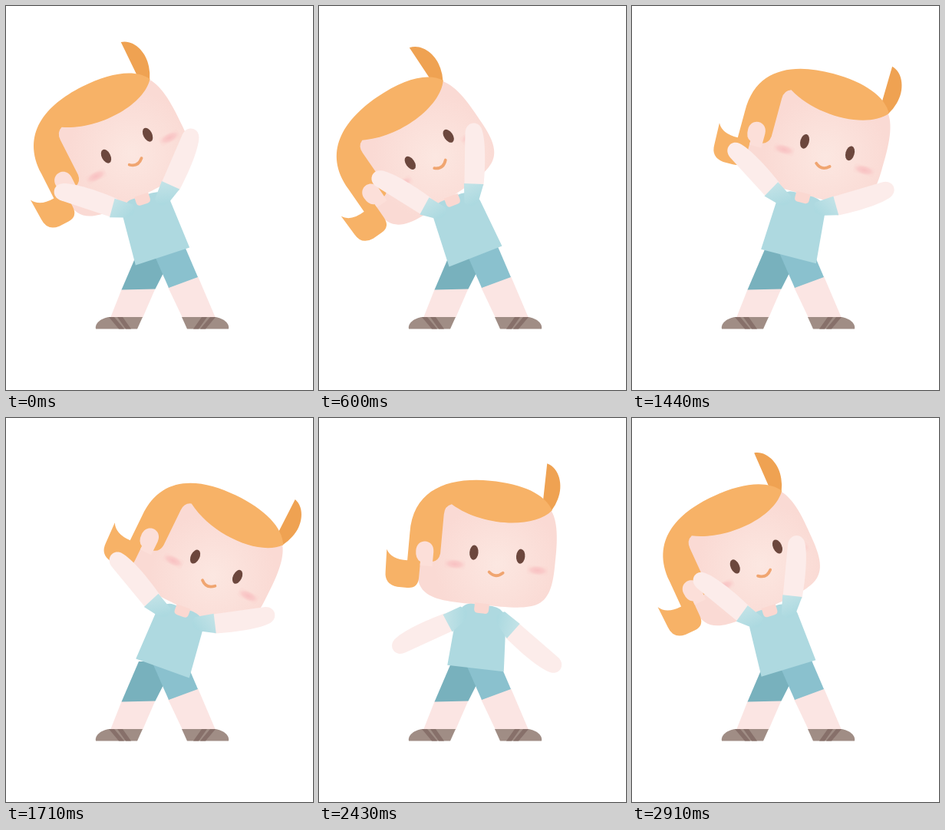
An HTML page for the animation above (2940 ms loop, 400 by 500 pixels).

```html
<!DOCTYPE html>
<html lang="en">
<head>
<meta charset="utf-8">
<title>Side stretch</title>
<style>
  html, body { margin: 0; width: 100%; height: 100%; overflow: hidden; background: #fff; }
  svg { display: block; width: 100vw; height: 100vh; }
</style>
</head>
<body>
<svg viewBox="0 0 400 500">
  <defs>
    <radialGradient id="face" gradientUnits="userSpaceOnUse" cx="222" cy="188" r="82">
      <stop offset="0" stop-color="#fce7e1"/>
      <stop offset="1" stop-color="#fadad4"/>
    </radialGradient>
    <radialGradient id="blush">
      <stop offset="0" stop-color="#f8bdbf" stop-opacity=".9"/>
      <stop offset=".6" stop-color="#f9c4c4" stop-opacity=".7"/>
      <stop offset="1" stop-color="#fad2ce" stop-opacity=".25"/>
    </radialGradient>
    <linearGradient id="cloth" gradientUnits="userSpaceOnUse" x1="-8" y1="-25" x2="5" y2="0">
      <stop offset="0" stop-color="#c3e3e7"/>
      <stop offset="1" stop-color="#acd9e0"/>
    </linearGradient>
    <path id="arm" fill="#fcecea" d="M-12,-21 L-10.5,-90 C-10,-104 6,-107 11,-95 C16,-82 16,-50 13,-21 Z"/>
    <path id="sleeve" fill="url(#cloth)" d="M-12.5,-24 L13,-23 L7,-3 Q0,12 -12,1 Z"/>
    <g id="shoe">
      <path fill="#a08d85" d="M117,420.500 C115,412 127,405 136,405 H178 L171,420.500 Z"/>
      <path fill="#87706a" d="M134,405 H141 L154,420.500 H147 Z M145,405 H152 L163,420.500 H156 Z"/>
    </g>
  </defs>

  <path fill="#fbe5e3" d="M151,368 H194.500 L178,406 H136 Z"/>
  <path fill="#fbe5e3" d="M211,366 L250,352 L273,406 H230 Z"/>
  <path fill="#78b1bd" d="M173,317 H215 L210,338 L194.500,368.500 L150.500,369.500 Z"/>
  <path fill="#8ac1ce" d="M190,317 L232,311 L250,353 L212,367 Z"/>
  <use href="#shoe"/>
  <use href="#shoe" transform="translate(407 0) scale(-1 1)"/>

  <g id="head">
    <path fill="#efa252" d="M275,52 C291,56 299,78 293,97 Q291,105 286,113 L274,106 Z"/>
    <path fill="url(#face)" d="M120,130 Q200,80 284,110 C296,124 298,150 297,182
      C297,205 295,226 280,235 C265,244 240,243 205,243 C160,242 119,246 120,205 Z"/>
    <path fill="#f7b267" d="M105,194 V158 C104,100 150,81 203,81 C246,81 276,92 287,112
      C265,139 197,141 156,116 Q147,119 147,130 V181 Q146,191 137,193 L122,195 V215
      Q122,229.500 108,229.500 H95 Q78,228 78,211 L77,182 Q84,195 105,194 Z"/>
    <path fill="#fcdfd9" d="M115,180 C115,163 138,163 138,180 V199 H122 V194 Q115,191 115,180 Z"/>
    <rect x="153" y="187" width="28" height="12.500" rx="4" fill="url(#blush)"/>
    <rect x="261" y="185.500" width="28" height="12.500" rx="4" fill="url(#blush)"/>
    <ellipse cx="190.500" cy="176" rx="5.700" ry="9.600" fill="#6c473d"/>
    <ellipse cx="251.500" cy="175.500" rx="5.700" ry="9.600" fill="#6c473d"/>
    <path fill="none" stroke="#f0a570" stroke-width="3.800" stroke-linecap="round" d="M212.500,199.500 Q221.500,207.500 230.500,199"/>
  </g>

  <g id="torso">
    <path fill="#aed9e0" d="M-26,-78 Q-22,-83 -15,-83 H12 L18,-82 Q28,-80 32,-66 L37,0 H-37 L-33,-66 Z"/>
    <path fill="#fbd8d1" d="M-11,-85 H8 V-77 Q8,-72 3,-72 H-6 Q-11,-72 -11,-77 Z"/>
    <g id="left">
      <use href="#arm"/>
      <use href="#sleeve" transform="scale(-1 1)"/>
    </g>
    <g id="right">
      <use href="#arm"/>
      <use href="#sleeve"/>
    </g>
  </g>
</svg>

<script>
const LOOP = 2940, TURN = 1410, STEP = 30;
const HIP = [204, 326], NECK = [-2, -73], SHOULDER = [23.5, -67];

// Head tilt: two dips to each side, as [ms, degrees]
const TILT = [[0, -27.4], [140, -35.3], [350, -29], [590, -35.2], [1020, -1], [1440, 14.7],
  [1650, 27], [1890, 17], [2085, 27.4], [2430, 4.7], [2910, -25.2]];

// Arms for one side: open, clap above, clap below, clap above, as [share of the side, degrees]
const CLAP = [[0, 47.5], [.02, 58], [.08, 61], [.35, 60], [.42, 29.5], [.48, 31],
  [.667, 123], [.705, 187], [.725, 188], [.84, 31], [.98, 28]];

// Smooth cyclic curve through the keys that never overshoots them
function curve(keys, period, t) {
  const n = keys.length;
  const at = i => {
    const [x, y] = keys[(i + n) % n];
    return [x + Math.floor(i / n) * period, y];
  };
  const rise = i => (at(i + 1)[1] - at(i)[1]) / (at(i + 1)[0] - at(i)[0]);
  const slope = i => {
    const u = rise(i - 1), v = rise(i);
    return u * v <= 0 ? 0 : 2 * u * v / (u + v);
  };
  let i = n - 1;
  while (keys[i][0] > t) i--;
  const [x0, y0] = at(i), [x1, y1] = at(i + 1);
  const span = x1 - x0, s = (t - x0) / span, r = 1 - s;
  return y0 * r * r * (1 + 2 * s) + y1 * s * s * (3 - 2 * s) +
    span * s * r * (slope(i) * r - slope(i + 1) * s);
}

const place = (id, [x, y], angle, tail = '') =>
  document.getElementById(id).setAttribute('transform',
    `translate(${x} ${y}) rotate(${angle})${tail}`);

function draw(now) {
  const t = Math.floor(now % LOOP / STEP) * STEP;
  const side = t < TURN ? t / TURN : (t - TURN) / (LOOP - TURN);

  // The body follows the head, less the further it bends
  const tilt = curve(TILT, LOOP, t);
  const lean = 27 * Math.tanh((tilt + 3) / 30);
  const arms = curve(CLAP, 1, side);
  const skew = Math.max(0, -lean) * 0.4;

  const q = lean * Math.PI / 180, cos = Math.cos(q), sin = Math.sin(q);
  const neck = [
    HIP[0] + NECK[0] * cos - NECK[1] * sin,
    HIP[1] + NECK[0] * sin + NECK[1] * cos
  ];
  place('torso', HIP, lean);
  place('head', neck, tilt + 0.5, ' translate(-206.3 -253)');
  place('right', SHOULDER, arms - skew);
  place('left', [-SHOULDER[0], SHOULDER[1]], -arms - skew);
}

const start = performance.now();
function tick() {
  draw(performance.now() - start);
  requestAnimationFrame(tick);
}
tick();
</script>
</body>
</html>
```
